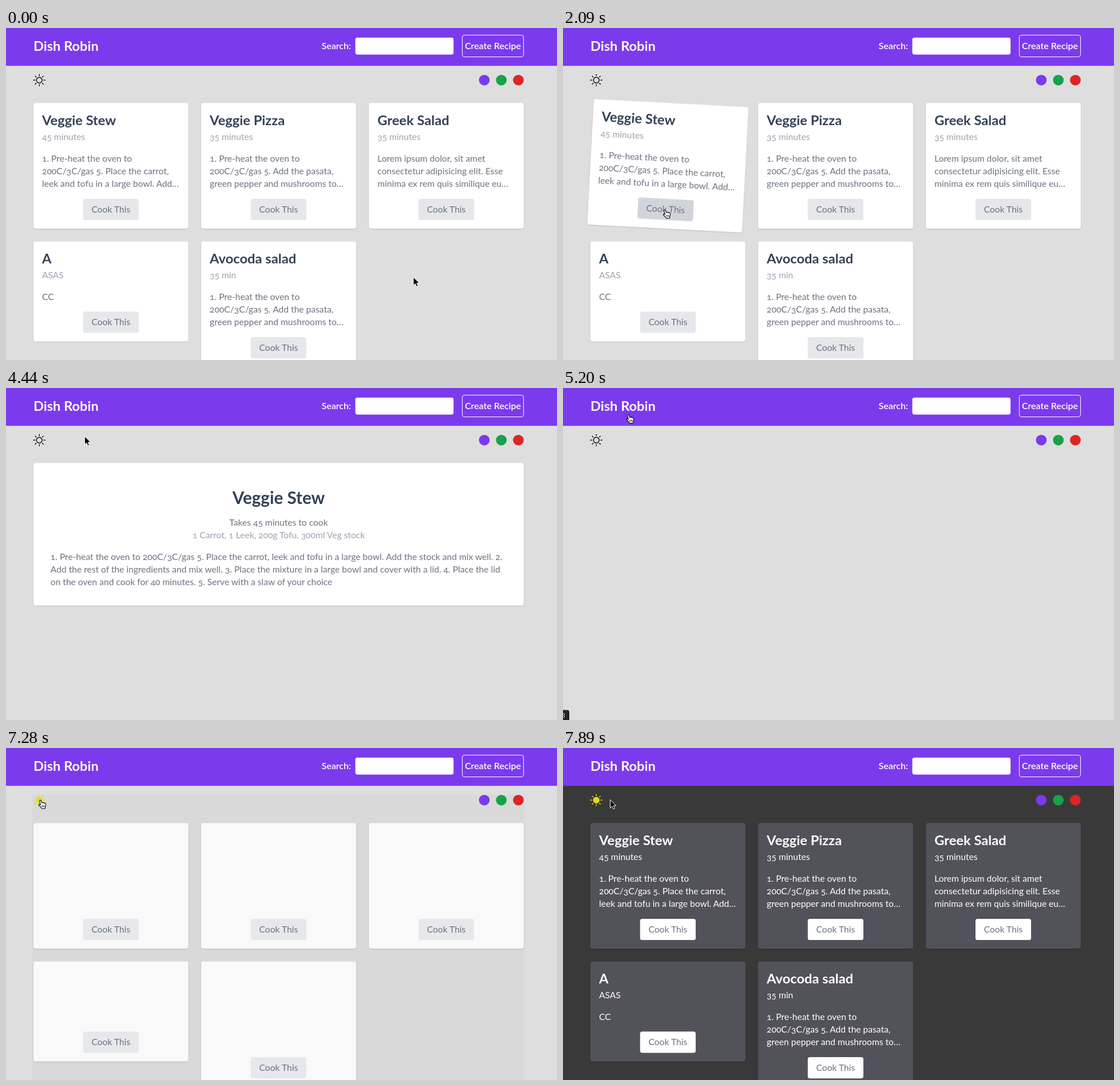
An HTML page for the animation above (8000 ms loop, 963 px wide and 581 px high).

```html
<!DOCTYPE html>
<html lang="en">
<head>
<meta charset="utf-8">
<title>Recipes</title>
<style>
  html, body { margin: 0; width: 100%; height: 100%; overflow: hidden; background: #dedede; }
  svg { display: block; width: 100%; height: 100%; }
  text { font: 400 15.6px Lato, "Open Sans", sans-serif; font-variant-numeric: oldstyle-nums; fill: #6b7280; white-space: pre; }
  .mid { text-anchor: middle; }
  .end { text-anchor: end; }
  .title { font-size: 23.7px; font-weight: 700; fill: #334155; }
  .big { font-size: 29.6px; }
  .meta { fill: #9ca3af; }
  .nav { font-size: 16px; font-weight: 600; fill: #fff; }
  .logo { font-size: 23.6px; font-weight: 700; }
  .panel { fill: var(--card); filter: drop-shadow(0 1px 1px #0002); }
  .btn { fill: var(--btn); }
  .hover .btn { fill: #d1d5db; }
  .dark .title, .dark .meta, .dark .body { fill: var(--ink); }
  .sun { fill: none; stroke: #000; stroke-width: 1.4; stroke-linecap: round; }
  .dark .sun { stroke: #e5dc1c; }
  .dark .sun circle { fill: #e5dc1c; }
  .status text { font: 11px Roboto, "Liberation Sans", sans-serif; fill: #d4d5d8; }
</style>
</head>
<body>
<svg id="stage" viewBox="0 0 963 581"></svg>
<script>
const LOOP = 8000;
const stage = document.getElementById('stage');

const text = (x, y, cls, str) => `<text x="${x}" y="${y}" class="${cls}">${str}</text>`;
const rect = (x, y, w, h, r, attrs) =>
  `<rect x="${x}" y="${y}" width="${w}" height="${h}" rx="${r}" ${attrs}/>`;
const lines = (x, y, rows) => rows.map((row, i) => text(x, y + i * 22.35, 'body', row)).join('');

const CARD_W = 270.7;
const pizzaSteps = ['1. Pre-heat the oven to', '200C/3C/gas 5. Add the pasata,', 'green pepper and mushrooms to…'];
const recipes = [
  ['Veggie Stew', '45 minutes',
    ['1. Pre-heat the oven to', '200C/3C/gas 5. Place the carrot,', 'leek and tofu in a large bowl. Add…']],
  ['Veggie Pizza', '35 minutes', pizzaSteps],
  ['Greek Salad', '35 minutes',
    ['Lorem ipsum dolor, sit amet', 'consectetur adipisicing elit. Esse', 'minima ex rem quis similique eu…']],
  ['A', 'ASAS', ['CC']],
  ['Avocoda salad', '35 min', pizzaSteps]
].map(([name, time, rows], i) => ({
  name, time, rows,
  x: 48 + (i % 3) * 293.1,
  y: i < 3 ? 131.3 : 373.4,
  h: 175 + (rows.length - 1) * 22.35
}));

const card = ({ name, time, rows, x, y, h }) => `<g class="card">
  ${rect(x, y, CARD_W, h, 3.7, 'class="panel"')}
  ${text(x + 15, y + 38.2, 'title', name)}
  ${text(x + 15, y + 65, 'meta', time)}
  ${lines(x + 15, y + 102.3, rows)}
  ${rect(x + 86.7, y + h - 52.1, 97.2, 37.2, 3.7, 'class="btn"')}
  ${text(x + CARD_W / 2, y + h - 28.3, 'mid', 'Cook This')}
</g>`;

const rays = Array.from({ length: 8 }, (_, i) =>
  `<path d="M7.8 0H10" transform="rotate(${i * 45})"/>`).join('');
const dots = ['#7c3aed', '#16a34a', '#dc2626'].map((c, i) =>
  `<circle cx="${835.9 + i * 29.8}" cy="91.2" r="9.3" fill="${c}"/>`).join('');

const status = (id, width, label) => `<g id="${id}" class="status">
  <path d="M0 563.5H${width - 4}q4 0 4 4V581H0Z" fill="#202124"/>
  ${text(width - 7, 577.3, 'end', label)}
</g>`;

stage.innerHTML = `
  <rect id="page" width="963" height="581"/>
  <rect id="main" x="46" y="82" width="860" height="499"/>
  <rect width="963" height="66.2" fill="#7c3aed"/>
  ${text(48, 40, 'nav logo', 'Dish Robin')}
  ${text(551.5, 37, 'nav', 'Search:')}
  ${rect(610.5, 16.8, 171.7, 29.7, 3.7, 'fill="#fff"')}
  ${rect(797.5, 12.5, 107, 38, 3.7, 'fill="none" stroke="#fff"')}
  ${text(851, 37, 'nav mid', 'Create Recipe')}
  <g class="sun" transform="translate(58.2 91.2)"><circle r="5"/>${rays}</g>
  ${dots}
  <g id="list">${recipes.map(card).join('')}</g>
  <g id="detail">
    ${rect(48, 131.3, 856.8, 249.4, 3.7, 'class="panel"')}
    ${text(476.5, 203, 'title big mid', 'Veggie Stew')}
    ${text(476.5, 241, 'mid', 'Takes 45 minutes to cook')}
    ${text(476.5, 263.3, 'meta mid', '1 Carrot, 1 Leek, 200g Tofu, 300ml Veg stock')}
    ${lines(77.8, 300.5, [
      '1. Pre-heat the oven to 200C/3C/gas 5. Place the carrot, leek and tofu in a large bowl. Add the stock and mix well. 2.',
      'Add the rest of the ingredients and mix well. 3. Place the mixture in a large bowl and cover with a lid. 4. Place the lid',
      'on the oven and cook for 40 minutes. 5. Serve with a slaw of your choice'])}
  </g>
  ${status('recipeLink', 55, '3/recipe/1')}
  ${status('homeLink', 11, '3')}
  <g id="cursor">
    <path id="arrow" d="M0 0V14.4L3.3 11.4L5.5 16.4L8 15.3L5.9 10.4H10.2Z" fill="#000" stroke="#fff"/>
    <g id="hand" stroke="#000" stroke-width="1.1" stroke-linejoin="round">
      <path fill="#fff" d="M-2.2 1.6C-2.4 .2-.3-.4 .3 1L1.8 5.2C1.8 4 3.6 3.8 4 5.2C4.4 4.2 6 4.4 6.3 5.8C7 5 8.2 5.6 8.4 6.8C8.8 8.6 8.6 10.6 7.6 12.6L7.4 15H1.6C.6 12.8-2 11.2-3.6 9.2C-4.6 7.8-3 6.8-1.8 7.8L-.6 8.8Z"/>
      <path fill="none" d="M2 9.2V12.4M4 9.2V12.4M6 9.2V12.4" stroke-width=".9"/>
    </g>
  </g>`;

const el = id => document.getElementById(id);
const show = (node, on) => node.setAttribute('visibility', on ? 'visible' : 'hidden');
const clamp = v => Math.min(1, Math.max(0, v));
const smooth = p => (1 - Math.cos(Math.PI * p)) / 2;

// CSS "ease": cubic-bezier(.25, .1, .25, 1)
function ease(x) {
  if (x <= 0 || x >= 1) return clamp(x);
  const bez = (a, b, u) => 3 * a * u * (1 - u) ** 2 + 3 * b * u * u * (1 - u) + u ** 3;
  let lo = 0, hi = 1;
  for (let i = 0; i < 20; i++) {
    const u = (lo + hi) / 2;
    if (bez(.25, .25, u) < x) lo = u; else hi = u;
  }
  return bez(.1, 1, lo);
}

// Progress that advances in n equal jumps, the first at start, the last at end
const stepped = (t, start, end, n) =>
  t < start ? 0 : t >= end ? 1 : (Math.floor((t - start) * (n - 1) / (end - start)) + 1) / n;

const mix = (a, b, p) => `rgb(${a.map((v, i) => Math.round(v + (b[i] - v) * p))})`;

// start, end, steps, x, y, hand
const moves = [
  [0, 0, 1, 712, 436, 0],
  [600, 800, 4, 708.5, 426.5, 0],
  [1040, 1800, 14, 196, 316, 1],
  [1850, 2090, 5, 179, 318, 1],
  [2550, 2670, 2, 180, 318, 1],
  [2940, 2940, 1, 181.5, 316.5, 0],
  [3180, 3440, 5, 204, 291, 0],
  [3980, 4440, 9, 137.5, 84.5, 0],
  [4500, 4670, 4, 115, 46.5, 1],
  [5740, 6510, 13, 107, 90, 0],
  [6570, 6750, 4, 61, 91, 1],
  [7690, 7890, 4, 82.5, 90.5, 0]
];

function drawCursor(t) {
  const i = moves.findLastIndex(m => m[0] <= t);
  const [start, end, n, x, y, hand] = moves[i];
  const [, , , x0, y0, wasHand] = moves[Math.max(0, i - 1)];
  const p = stepped(t, start, end, n), k = smooth(p);
  const isHand = hand && (wasHand || p === 1);
  el('cursor').setAttribute('transform', `translate(${x0 + (x - x0) * k} ${y0 + (y - y0) * k})`);
  show(el('hand'), isHand);
  show(el('arrow'), !isHand);
}

const cards = [...document.querySelectorAll('.card')];

function tilt(i, angle) {
  const { x, y, h } = recipes[i];
  cards[i].setAttribute('transform', `rotate(${angle} ${x + CARD_W / 2} ${y + h / 2})`);
}

function drawList(t) {
  show(el('list'), t < 2940 || t >= 5740);
  const tick = 1040 + Math.floor((t - 1040) / 58.46) * 58.46;
  const turn = from => 3 * ease((tick - from) / 300);
  tilt(0, t < 2940 ? turn(1540) : 0);
  tilt(4, t < 2940 ? turn(1240) - turn(1510) : 0);
  cards[0].classList.toggle('hover', t >= 1800 && t < 2940);
}

function drawTheme(t) {
  const step = Math.floor((t - 7280) / 80);
  const p = step < 0 ? 0 : step > 2 ? 1 : ease((15 + step * 80) / 300);
  const bg = q => mix([222, 222, 222], [57, 57, 57], q);
  const panel = mix([255, 255, 255], [82, 82, 91], p);
  el('page').setAttribute('fill', bg(step > 0 ? p : 0));
  el('main').setAttribute('fill', bg(p));
  stage.style.setProperty('--card', panel);
  stage.style.setProperty('--btn', mix([229, 231, 235], [255, 255, 255], p));
  // White text is lost on the card until the card darkens
  stage.style.setProperty('--ink', step > 0 ? '#fff' : panel);
  stage.classList.toggle('dark', p > 0);
}

function draw(t) {
  drawTheme(t);
  drawList(t);
  show(el('detail'), t >= 3180 && t < 5200);
  el('recipeLink').setAttribute('opacity', stepped(t, 2260, 2380, 3) - stepped(t, 3240, 3440, 4));
  el('homeLink').setAttribute('opacity', stepped(t, 4850, 4960, 3) - stepped(t, 5860, 6040, 4));
  drawCursor(t);
}

const begin = performance.now();
function frame() {
  draw((performance.now() - begin) % LOOP);
  requestAnimationFrame(frame);
}
frame();
</script>
</body>
</html>
```
